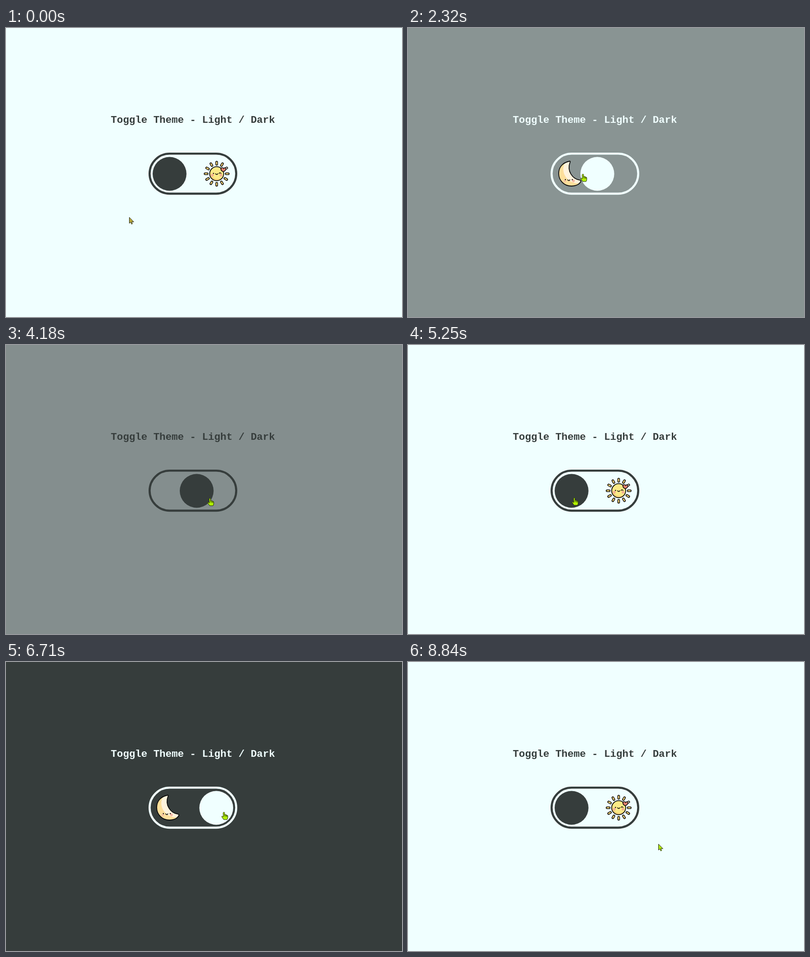
Recreate the animation shown at these times as an HTML page with a canvas. Size 875 px wide and 640 px high, loop 8.9 s.

```html
<!DOCTYPE html>
<html lang="en">
<head>
<meta charset="utf-8">
<title>Toggle Theme</title>
<style>
  html, body { margin: 0; width: 100%; height: 100%; overflow: hidden; background: #f0ffff; }
  canvas { display: block; }
</style>
</head>
<body>
<canvas id="stage" width="875" height="640"></canvas>
<script>
const ctx = document.getElementById('stage').getContext('2d');
const LOOP = 8900, STEP = 65, FADE = 1000, LEAD = 125;
const LIGHT = [240, 255, 255], DARK = [54, 61, 60], INK = '#0b0b0b';

const toggles = [[2120, true], [4050, false], [5580, true], [7850, false]];
const clicks = [[1920, 2120], [3850, 4050], [5380, 5580], [7710, 7850]];

// time, x, y of the pointer's hot spot
const route = [
  [0, 272, 419], [800, 272, 419], [1450, 377, 323], [2180, 377, 323],
  [2320, 385.5, 322.5], [2850, 434, 342], [3120, 434, 342], [3450, 450.5, 339],
  [4180, 450.5, 339], [4840, 368, 356], [4910, 368, 356], [5050, 365, 350],
  [5250, 366.5, 338], [5380, 373, 340], [5710, 373, 340], [6450, 440, 348],
  [6710, 480.5, 332], [8180, 480.5, 332], [8710, 545, 401], [8840, 553, 403],
  [8900, 553, 403]
];

const shapes = {
  arrow: new Path2D('M0 0V13L3 10.5L5 15L7 14L5.2 9.8H9.5Z'),
  hand: new Path2D('M-1 1.5Q.5-.8 2 1.5V6Q3.5 5 4.8 6.3Q6.3 5.8 7 7.3Q9 7 9 9V13Q8.5 15 7.5 17H0L-4.3 10.8Q-4.5 8-1 10.6Z'),
  knuckles: new Path2D('M2 6V9.5M4.8 6.5V10M7 7.5V10.5'),
  moon: new Path2D('M357 295C341 298 333 309 333 322C333 338 345 350 361 350C371 350 379 346 382 339.5C382.5 337.5 380 336.5 378 336.3C364 334 350.5 317 358 297.5C359 295.5 358.5 294.8 357 295Z'),
  moonShade: new Path2D('M352 296C339 299 333 309 333 322C333 338 345 350 361 350C368 350 375 347 378 344C354 345 336 322 346 300Z'),
  heart: new Path2D('M480 318.5C474 315.5 473.5 310.5 476.5 309.5C478.5 308.8 480 310 480.6 311.2C482 309 485.5 309 486 311.5C486.5 314.5 483 317.5 480 318.5Z')
};

const rgb = c => `rgb(${c.map(Math.round)})`;
const mix = (a, b, k) => a + (b - a) * k;
const bezier = (a, b, u) => 3 * a * u * (1 - u) ** 2 + 3 * b * u * u * (1 - u) + u ** 3;

function ease(p) {
  if (p >= 1) return 1;
  let lo = 0, hi = 1;
  for (let i = 0; i < 24; i++) {
    const mid = (lo + hi) / 2;
    if (bezier(.25, .25, mid) < p) lo = mid; else hi = mid;
  }
  return bezier(.1, 1, lo);
}

function themeAt(t) {
  const last = toggles.filter(([start]) => t >= start).pop();
  if (!last) return { dark: false, done: 1 };
  const elapsed = Math.floor((t - last[0]) / STEP) * STEP;
  return { dark: last[1], done: ease((elapsed + LEAD) / FADE) };
}

function pointerAt(t) {
  const i = route.findIndex(p => p[0] > t);
  const [t0, x0, y0] = route[i - 1], [t1, x1, y1] = route[i];
  const k = (t - t0) / (t1 - t0);
  return [Math.round(mix(x0, x1, k)), Math.round(mix(y0, y1, k))];
}

function disc(x, y, r, fill) {
  ctx.beginPath();
  ctx.arc(x, y, r, 0, 7);
  ctx.fillStyle = fill;
  ctx.fill();
}

function arc(x, y, r, from, to, width, color = INK) {
  ctx.beginPath();
  ctx.arc(x, y, r, from, to);
  ctx.lineWidth = width;
  ctx.strokeStyle = color;
  ctx.stroke();
}

function shape(path, fill, stroke, width) {
  ctx.fillStyle = fill;
  ctx.fill(path);
  if (!stroke) return;
  ctx.strokeStyle = stroke;
  ctx.lineWidth = width;
  ctx.stroke(path);
}

function capsule(from, to, width, color) {
  ctx.beginPath();
  ctx.moveTo(from, 0);
  ctx.lineTo(to, 0);
  ctx.lineWidth = width;
  ctx.strokeStyle = color;
  ctx.stroke();
}

function drawSun() {
  const x = 465.5, y = 322.7;
  for (let i = 0; i < 12; i++) {
    ctx.save();
    ctx.translate(x, y);
    ctx.rotate(i * Math.PI / 6);
    capsule(21, 25.6, 5.6, INK);
    capsule(21.2, 25.4, 2.6, i === 11 ? '#fff4dc' : '#fbd878');
    ctx.restore();
  }
  disc(x, y, 15.5, '#f4cf75');
  ctx.save();
  ctx.beginPath();
  ctx.arc(x, y, 15.5, 0, 7);
  ctx.clip();
  disc(x + 2, y - 3, 15, '#fbea86');
  ctx.restore();
  arc(x, y, 15.5, 0, 7, 1.8);
  disc(456, 326, 3, '#f5b193');
  disc(475, 326, 3, '#f5b193');
  disc(458.5, 322, 1.3, INK);
  arc(465.5, 322, 2.4, .2, 2.94, 1.5);
  arc(473, 322.8, 2.2, 3.4, 6, 1.5);
  shape(shapes.heart, '#e2806f', INK, 1.6);
}

function drawMoon() {
  shape(shapes.moon, '#fff3dc');
  ctx.save();
  ctx.clip(shapes.moon);
  shape(shapes.moonShade, '#fddf9b');
  ctx.restore();
  disc(346.5, 339, 3, '#f8c3a0');
  disc(365.5, 338.5, 3, '#f6b9a5');
  shape(shapes.moon, 'transparent', INK, 1.8);
  disc(347.8, 335.7, 1.3, INK);
  disc(363, 335.7, 1.3, INK);
  arc(355.3, 335.5, 2.4, .2, 2.94, 1.5);
}

function drawPointer(t) {
  const [x, y] = pointerAt(t);
  const overSwitch = Math.hypot(x - Math.min(464.5, Math.max(361.5, x)), y - 322.7) < 46.5;
  ctx.save();
  ctx.translate(x, y);
  if (clicks.some(([from, to]) => t >= from && t < to)) {
    ctx.globalCompositeOperation = 'difference';
    arc(0, 0, 9.5, 0, 7, 3, '#fff');
    ctx.globalCompositeOperation = 'source-over';
  }
  if (overSwitch) {
    shape(shapes.hand, '#b2f200', '#1c2410', 1);
    ctx.stroke(shapes.knuckles);
  } else {
    ctx.translate(.5, .5);
    shape(shapes.arrow, t < 860 ? '#b9a83a' : '#aee600', '#22281c', 1);
  }
  ctx.restore();
}

function draw(t) {
  const { dark, done } = themeAt(t);
  const [from, to] = dark ? [LIGHT, DARK] : [DARK, LIGHT];
  const fore = rgb(from);
  ctx.fillStyle = rgb(from.map((c, i) => mix(c, to[i], done)));
  ctx.fillRect(0, 0, 875, 640);

  ctx.fillStyle = fore;
  ctx.font = 'bold 22.4px "Courier New", "Liberation Mono", monospace';
  ctx.textAlign = 'left';
  ctx.fillText('Toggle Theme - Light / Dark', 231.6, 210);

  ctx.beginPath();
  ctx.roundRect(317.3, 278.3, 191.4, 88.6, 44.3);
  ctx.lineWidth = 4.6;
  ctx.strokeStyle = fore;
  ctx.stroke();

  if (done >= .5) (dark ? drawMoon : drawSun)();
  const [start, end] = dark ? [361.4, 464.6] : [464.6, 361.4];
  disc(mix(start, end, done), 323, 37.4, fore);
  drawPointer(t);
}

ctx.lineCap = ctx.lineJoin = 'round';
function tick() {
  draw(performance.now() % LOOP);
  requestAnimationFrame(tick);
}
tick();
</script>
</body>
</html>
```
